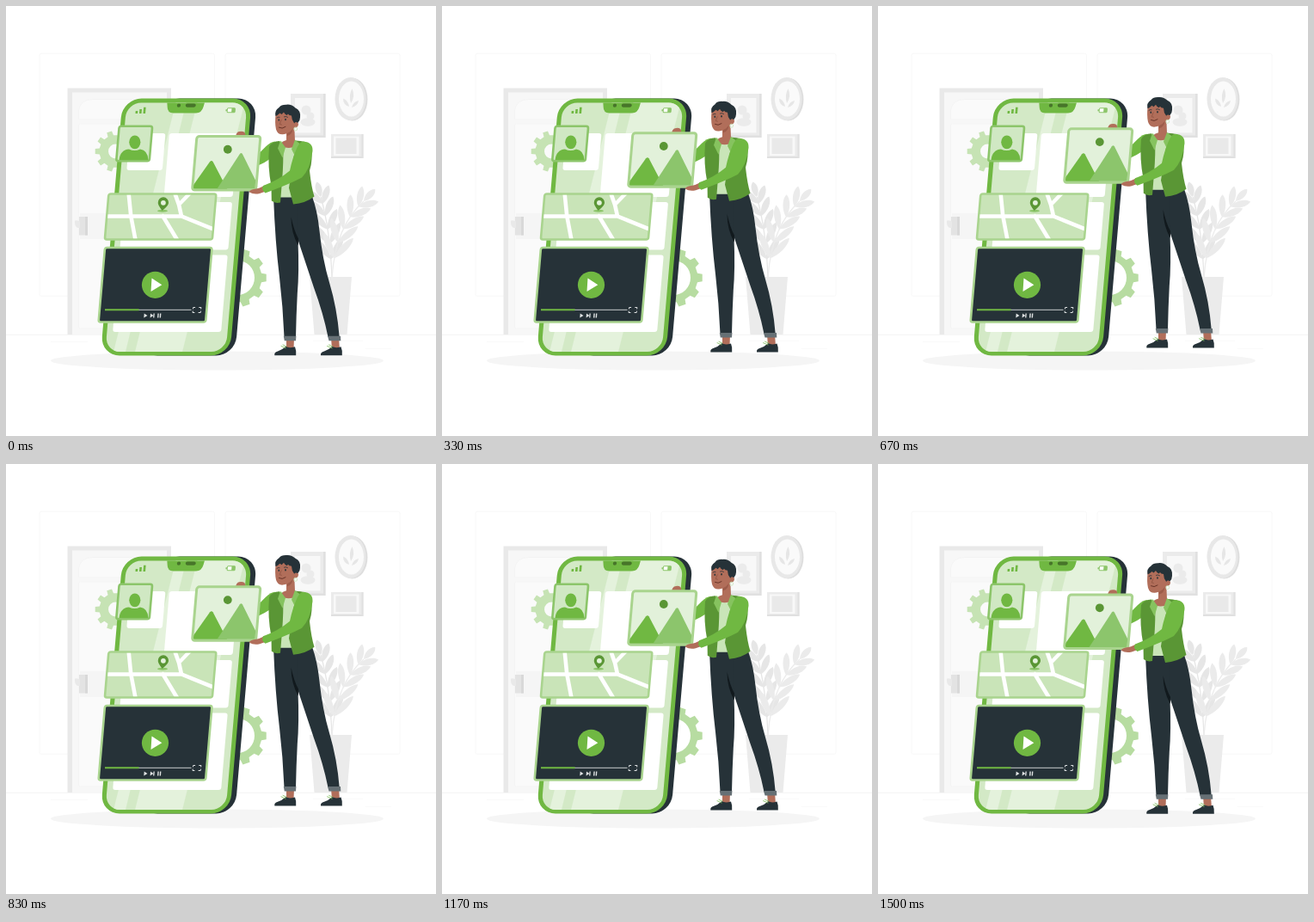
These frames come from a looping animation (500 by 500 pixels, 1.54 s). An HTML page:

```html
<!DOCTYPE html>
<html lang="en">
<head>
<meta charset="utf-8">
<title>Sharing media on a phone</title>
<style>
html, body { margin: 0; width: 100%; height: 100%; overflow: hidden; background: #fff; }
svg { display: block; width: 100%; height: 100%; }
.g { fill: #70b842; }
.gd { fill: #5a9635; }
.ink { fill: #263238; }
.skin { fill: #b16e5a; }
.gear { fill: #b7dca1; fill-rule: evenodd; }
.card { stroke: #a9d48e; stroke-width: 2.6; }
.line { fill: none; stroke-linecap: round; stroke-linejoin: round; }
</style>
</head>
<body>
<svg viewBox="0 0 500 500">
  <defs>
    <clipPath id="screen"><rect x="140.8" y="112.5" width="140.2" height="289.5" rx="17"/></clipPath>
    <clipPath id="photo"><rect x="227" y="153" width="71.5" height="60" rx="1.5"/></clipPath>
    <clipPath id="map"><rect x="130.2" y="219.7" width="122.6" height="50.6" rx="1.5"/></clipPath>
  </defs>

  <!-- room -->
  <g fill="#fff" stroke="#f7f7f7" stroke-width=".8">
    <rect x="39" y="55.3" width="203.5" height="282" rx="2"/>
    <rect x="255" y="55.3" width="203" height="282" rx="2"/>
  </g>
  <path d="M0 382.3H500" stroke="#f0f0f0" stroke-width=".7"/>
  <path d="M357 389.4H415M418 398.3H448M52 390.5H95" stroke="#f5f5f5" stroke-width=".6"/>
  <rect x="71.5" y="95.5" width="120.5" height="286.5" fill="#e9e9e9"/>
  <rect x="77" y="100.5" width="110" height="281.5" fill="#f7f7f7"/>
  <g fill="#fafafa" stroke="#f3f3f3" stroke-width=".8">
    <path d="M84.5 132V122Q86 108.500 101 108.500H163Q178 108.500 179.500 122V132Z"/>
    <rect x="84.5" y="137" width="95" height="238" rx="2"/>
  </g>
  <rect x="86" y="241" width="50" height="30" fill="#f5f5f5"/>
  <rect x="85" y="245" width="10" height="21.5" fill="#e3e3e3"/>
  <rect x="92" y="245" width="3" height="21.5" fill="#d8d8d8"/>
  <path d="M80 251Q79 248 86 250.500V258Q80 259 80 251Z" fill="#e9e9e9"/>

  <!-- wall pictures -->
  <rect x="331" y="102" width="40.5" height="51" fill="#ebebeb"/>
  <path d="M369 102H371.500V153H331V150.500H369Z" fill="#e0e0e0"/>
  <rect x="336" y="107" width="29.5" height="40.5" fill="#f8f8f8"/>
  <g fill="#ebebeb">
    <circle cx="349" cy="121" r="5.5"/><circle cx="354" cy="128" r="4.5"/>
    <ellipse cx="351" cy="135" rx="8.5" ry="4.8"/>
  </g>
  <ellipse cx="402.5" cy="108.5" rx="18" ry="25" fill="#dedede"/>
  <ellipse cx="400.5" cy="108" rx="18" ry="25" fill="#e8e8e8"/>
  <ellipse cx="401.5" cy="108" rx="14.5" ry="20.5" fill="#fafafa"/>
  <g fill="#e6e6e6">
    <path d="M401 113Q398 104 402.500 96Q406.500 105 401 113Z"/>
    <path d="M399 117Q392 115 392 107.500Q398 110 399 117Z"/>
    <path d="M402 118Q404 111 410 110Q409 116 402 118Z"/>
  </g>
  <rect x="378" y="149" width="37.5" height="28" fill="#ebebeb"/>
  <path d="M413.500 149H415.500V177H378V175H413.500Z" fill="#e0e0e0"/>
  <rect x="381" y="151.5" width="29.5" height="22.5" fill="#f8f8f8"/>
  <rect x="383.5" y="153.5" width="24" height="18.5" fill="#e9e9e9"/>

  <g id="plant"></g>
  <path d="M353 315H402L396.500 382H358.500Z" fill="#ebebeb"/>
  <ellipse cx="245.5" cy="412.5" rx="193.5" ry="11" fill="#f5f5f5"/>

  <path id="gearA" class="gear" style="fill:#c6e3b4"/>
  <path id="gearB" class="gear"/>

  <!-- phone, sheared around its top edge -->
  <g transform="matrix(1 0 -.086 1 9.2 0)">
    <rect class="ink" x="180" y="107.5" width="112" height="299" rx="22"/>
    <rect class="g" x="135.7" y="107.5" width="150.3" height="299" rx="22"/>
    <g clip-path="url(#screen)">
      <rect x="130" y="107" width="160" height="300" fill="#d3e9c6"/>
      <path d="M198.800 107H210.800L163.600 407H149.600ZM223.800 107H278.800L229.600 407H174.600Z" fill="#e4f2dc"/>
      <path d="M187 107H232.500L230.500 117Q229 124.500 222.500 124.500H196Q189 124.500 188.500 117Z" class="g"/>
      <circle cx="201.7" cy="115.6" r="2.2" fill="#47752a"/>
      <rect x="209.5" y="113.5" width="12" height="4.2" rx="2.1" fill="#47752a"/>
      <path class="g" d="M152 122h2.600v3h-2.600zM156.500 120h2.600v5h-2.600zM161 117.800h2.600v7.200h-2.600z"/>
      <rect x="258.5" y="118.7" width="9" height="5" rx="1" fill="#fff" stroke="#8cc56a" stroke-width="1"/>
      <path d="M263.500 118.700h4v5h-4zM256.700 120.300h1.500v2h-1.500z" fill="#8cc56a"/>
      <g fill="#fff">
        <rect x="147.5" y="148" width="41.5" height="43" rx="3"/>
        <rect x="193.5" y="148" width="80" height="74" rx="3"/>
        <rect x="147.5" y="228" width="126" height="55.5" rx="3"/>
        <rect x="147.5" y="289.5" width="126" height="89.5" rx="3"/>
      </g>
    </g>

    <g class="card">
      <rect x="134.5" y="139.8" width="38.5" height="40.5" rx="2.5" fill="#d0e8c3" stroke="#8cc56a"/>
      <rect x="129" y="218.5" width="125" height="53" rx="2.5" fill="#c9e4b8"/>
      <rect x="130" y="281" width="124.5" height="86.5" rx="2.5" fill="#263238"/>
    </g>
    <g clip-path="url(#map)" class="line" stroke="#fff" stroke-width="4.500">
      <path d="M152 217L157 244L165 273M125 244.500H216L258 261M205.500 217L211.700 231L215.700 244M224 217L211.700 231M194 244L214 273"/>
    </g>
  </g>

  <!-- contact, place and player details -->
  <ellipse class="g" cx="149.8" cy="158.3" rx="6.6" ry="7.9"/>
  <path class="g" d="M131.500 179Q133 167 143 166.500Q149.500 169.500 156 166.500Q165 168 165.500 179Z"/>
  <ellipse cx="182" cy="238.3" rx="6" ry="1.5" fill="#8cc56a"/>
  <path class="gd" d="M181.500 238C178.500 233.500 176.500 231 176.800 228.300A6.100 6.100 0 0 1 189 228.500C189 231.500 186 234.500 181.500 238Z"/>
  <circle cx="182.9" cy="228.8" r="2.9" fill="#e4f2dc"/>
  <circle class="g" cx="173.5" cy="324.3" r="15.6"/>
  <path d="M169.500 316.500L181.300 324.300L168.500 332Z" fill="#fff"/>
  <path d="M154 353.300H215.500" stroke="#c8cccd" stroke-width="1"/>
  <path d="M115 353.300H154.500" stroke="#70b842" stroke-width="2"/>
  <path fill="#e0e3e4" d="M160.700 357.600L164.500 360L160.300 362.500ZM168 357.600L171.400 360L167.600 362.500ZM171.500 357.600h1.300l-.4 4.900h-1.300zM176.400 357.600h1.400l-.4 4.900h-1.400zM179 357.600h1.400l-.4 4.900h-1.400z"/>
  <path class="line" stroke="#e0e3e4" stroke-width="1" d="M219.700 350.500H217.700L217.500 352M224.700 350.500H226.900L226.700 352M217.200 355L217 356.500H219M226.400 355L226.200 356.500H224"/>

  <!-- everything that floats -->
  <g id="float">
    <!-- far arm and fingers -->
    <path class="g" d="M313 158Q308 158 302 164L290 176V187Q302 183 311 175Z"/>
    <path class="skin" d="M267 152Q268 147 271 146.500Q275 145.500 277.500 147.500L279 153Z"/>

    <!-- picture card -->
    <g transform="matrix(1 0 -.086 1 9.2 0)">
      <rect class="card" x="225.8" y="152" width="74" height="62.5" rx="3" fill="#e2f1da" style="stroke-width:3"/>
      <g clip-path="url(#photo)">
        <path class="g" d="M222 216L243.500 181.500Q245.300 179.500 247 181.500L268 216Z"/>
        <path d="M253 216L277.500 172.500Q279 170.500 280.500 172.500L303 211V216Z" fill="#8cc56c"/>
      </g>
    </g>
    <circle class="gd" cx="257.8" cy="167.3" r="4.9"/>

    <!-- legs -->
    <path class="skin" d="M326 386H335L334.500 400H326ZM378 386H387L388 400H379Z"/>
    <path class="ink" d="M312.300 406.700Q311.600 403 316 402Q321 400.500 325.500 396.300Q329 399 336 396.700Q337.800 401 337.200 406.700Z"/>
    <path class="ink" d="M366 406.700Q365.400 403 370 402Q375 400.500 379.500 396.300Q383 399 389.500 396.700Q391.400 401 390.800 406.700Z"/>
    <path class="line" stroke="#8cc56a" stroke-width=".9" d="M320 396L325 398.300M322 394.500L326 396.500M373.500 396L379 398.300M375.500 394.500L380 396.500"/>
    <path class="ink" d="M331 222H356Q362 238 364.500 262Q368 295 376 322Q385 352 387.700 385.500H374.500Q369 358 358 328Q350 304 338 268L331 255Z"/>
    <path class="ink" d="M311 222H341Q338 246 339.500 273Q341 310 338.800 335Q337.500 360 337 385.500H323.500Q322 350 318 316Q313 275 311 222Z"/>
    <path d="M331.500 246Q335 262 340 271L339.800 279Q331.500 264 331.500 246Z" fill="#11191d"/>
    <path d="M322.800 384.300H337.400L337 389.700H323.800ZM374 384.300H389L389.300 389.700H375.500Z" fill="#667075"/>

    <!-- torso -->
    <path d="M316 158H342L336 223H318Z" fill="#c9e5b8"/>
    <path class="skin" d="M326 146H335.500L336 157Q341 160 337 163Q329 168 320 163Q318 159 326 156.500Z"/>
    <path class="gd" d="M318 157.500Q309 158 306 164Q304 187 308.500 210L308.800 227Q313 230.500 319 229L321 204Q323 180 322 165Z"/>
    <path class="gd" d="M337 157Q349 157 355 163Q357 180 353 192Q355 211 358.500 222Q348 230 334 231L329 212Q333 184 336 168Z"/>
    <path d="M319 157L325 165L321.500 177L316 166ZM336 156L342 161L337 177L332 167Z" fill="#86c35f"/>

    <!-- near arm -->
    <path class="skin" d="M301 209Q294 213 288 213.500Q282 215 283 217Q288 220 295 218.500L302 216Z"/>
    <path class="g" d="M346 158Q357 159 356.500 169Q354 190 344 200Q331 207 301.500 218Q296 214 299 209.500Q317 203 330 192Q333 177 339 164Q342 158 346 158Z"/>

    <!-- head -->
    <path class="skin" d="M313.700 126Q312.300 136 314 144Q316 150.300 322 149.800Q325 149.500 327 148.500L335 150V142Q340 142 340 137.500Q339 134 336 135L334 121Q322 116 313.700 126Z"/>
    <path d="M327 148.500Q331 147 333.500 143Q333 150 327 151.500Z" fill="#9c5c4a"/>
    <path class="ink" d="M313.500 128.500Q311.800 122 317.500 118.500Q320 115 326 115.200Q332 114.500 336.500 119Q343 122 342 130Q342 134 339.300 136.500Q336.800 134.500 335.200 137Q332 133 332 128Q329 128 328 126L326.500 127.500Q324 126 323 124L320.500 126.500L318.500 125Q316 127.500 313.500 128.500Z"/>
    <ellipse class="ink" cx="317.300" cy="133" rx=".8" ry="1.200"/>
    <ellipse class="ink" cx="325" cy="132.500" rx=".8" ry="1.200"/>
    <path class="line" stroke="#263238" stroke-width=".8" d="M315 130.500Q316 129.300 318 129.800M323.500 129.300Q325.500 128.300 327.500 129.800"/>
    <path class="line" stroke="#8f5241" stroke-width=".8" d="M320 133L318.300 138L320.500 138.500"/>
    <path class="line" stroke="#55251b" stroke-width=".8" d="M317.500 141.800Q321 144 325 141"/>
    <circle cx="336.700" cy="143.500" r="2" fill="none" stroke="#c9e5b8" stroke-width=".8"/>
  </g>
</svg>
<script>
const LOOP = 1540, STEPS = 37, RISE = 10;
const el = id => document.getElementById(id);
const float = el('float');

function gear(id, cx, cy, outer, root, hole, teeth) {
  const pts = [], pitch = 2 * Math.PI / teeth;
  for (let i = 0; i < teeth; i++) {
    for (const [r, a] of [[root, -.29], [outer, -.2], [outer, .2], [root, .29]]) {
      const t = (i + a) * pitch;
      pts.push((cx + r * Math.cos(t)).toFixed(1) + ' ' + (cy + r * Math.sin(t)).toFixed(1));
    }
  }
  el(id).setAttribute('d', `M${pts.join('L')}Z M${cx - hole} ${cy}` +
    `a${hole} ${hole} 0 1 0 ${2 * hole} 0a${hole} ${hole} 0 1 0 ${-2 * hole} 0Z`);
}

function leaf(x, y, deg, len, wide) {
  return `<path transform="translate(${x} ${y}) rotate(${deg})" ` +
    `d="M0 0C${len * .3} ${-wide} ${len * .8} ${-wide} ${len} 0C${len * .8} ${wide} ${len * .3} ${wide} 0 0Z"/>`;
}

// A curved stem with paired leaves shrinking towards the tip.
function frond(a, b, c, pairs, size, fill) {
  const at = (t, k) => (1 - t) ** 2 * a[k] + 2 * t * (1 - t) * b[k] + t * t * c[k];
  let out = '', dir = 0;
  for (let i = 0; i <= pairs; i++) {
    const t = .2 + .7 * i / pairs, x = at(t, 0), y = at(t, 1);
    dir = Math.atan2(at(t + .02, 1) - y, at(t + .02, 0) - x) * 180 / Math.PI;
    const len = size * (1 - .25 * i / pairs);
    out += leaf(x, y, dir - 33, len, 5.2) + leaf(x, y, dir + 33, len, 5.2);
  }
  out += leaf(c[0], c[1], dir, size * .6, 5);
  return `<g fill="${fill}">${out}<path d="M${a}Q${b} ${c}" fill="none" stroke="${fill}" stroke-width="1.3"/></g>`;
}

gear('gearA', 127.5, 169, 24, 19, 8.5, 10);
gear('gearB', 269, 316, 34, 28.5, 20, 10);
el('plant').innerHTML =
  frond([379, 316], [377, 260], [366, 222], 4, 30, '#e6e6e6') +
  frond([379, 316], [383, 256], [416, 227], 4, 32, '#ebebeb');

function draw(now) {
  const step = Math.floor(now % LOOP / LOOP * STEPS) + 1;
  const lift = RISE * (1 - Math.abs(1 - 2 * step / STEPS));
  float.setAttribute('transform', `translate(0 ${-lift.toFixed(3)})`);
}

function tick() {
  draw(performance.now());
  requestAnimationFrame(tick);
}
tick();
</script>
</body>
</html>
```
